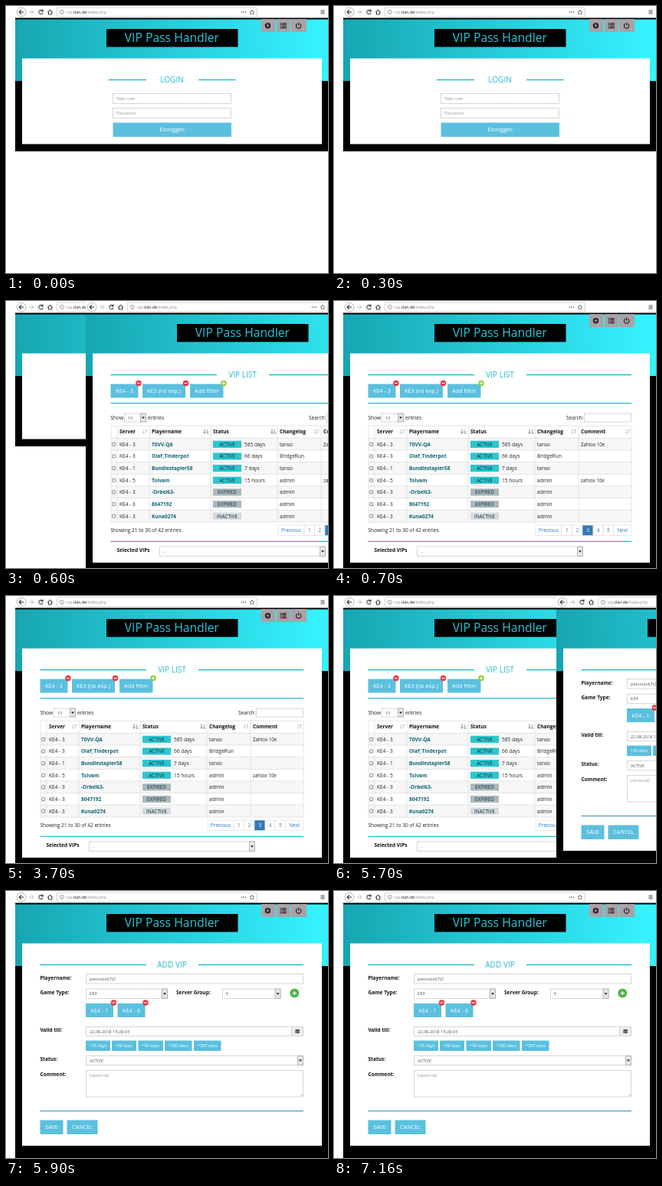
Recreate the animation shown at these times as an HTML page. Size 420 by 349 pixels, loop 8000 ms.

```html
<!DOCTYPE html>
<html lang="de">
<head>
<meta charset="utf-8">
<title>VIP Pass Handler</title>
<style>
  html, body { margin: 0; width: 100%; height: 100%; overflow: hidden; background: #fff; }
  svg { display: block; width: 420px; height: 349px; font-family: "Open Sans", sans-serif; }
  text { white-space: pre; }
</style>
</head>
<body>
<svg id="stage" viewBox="0 0 420 349"></svg>
<script>
const TEAL = '#24bccb', BLUE = '#5bc0de', INK = '#222', BORDER = '#ccc', LINK = '#337ab7';

// Basic shapes. Boxes are given by their edges, text by its vertical centre.
const rect = (x1, y1, x2, y2, fill, extra = '') =>
  `<rect x="${x1}" y="${y1}" width="${x2 - x1}" height="${y2 - y1}" fill="${fill}" ${extra}/>`;
const frame = (x1, y1, x2, y2, stroke = BORDER, fill = '#fff') =>
  rect(x1 + .5, y1 + .5, x2 - .5, y2 - .5, fill, `stroke="${stroke}" stroke-width=".8"`);
const text = (x, y, str, size = 6.55, fill = INK, extra = '') =>
  `<text x="${x}" y="${y + size * .36}" font-size="${size}" fill="${fill}" ${extra}>${str}</text>`;
const bold = (x, y, str, fill = '#111') => text(x, y, str, 6.55, fill, 'font-weight="700"');
const centred = (x, y, str, size, fill) => text(x, y, str, size, fill, 'text-anchor="middle"');
const path = (d, stroke = '#444', width = 1) =>
  `<path d="${d}" fill="none" stroke="${stroke}" stroke-width="${width}"/>`;
const shape = (d, fill) => `<path d="${d}" fill="${fill}"/>`;
const dot = (x, y, r, fill, extra = '') => `<circle cx="${x}" cy="${y}" r="${r}" fill="${fill}" ${extra}/>`;
const rule = (x1, x2, y, color = TEAL) => path(`M${x1} ${y}H${x2}`, color, 1.3);
const plus = (x, y, r, color, width) => path(`M${x - r} ${y}h${2 * r}M${x} ${y - r}v${2 * r}`, color, width);

// Form parts
const button = (x1, y1, x2, y2, label, size = 7.3) =>
  rect(x1, y1, x2, y2, BLUE) + centred((x1 + x2) / 2, (y1 + y2) / 2, label, size, '#fff');
const input = (x1, y1, x2, y2, value = '', fill = '#555') =>
  frame(x1, y1, x2, y2) + text(x1 + 5, (y1 + y2) / 2, value, 5.6, fill);
const select = (x1, y1, x2, y2, value) => {
  const y = (y1 + y2) / 2;
  return input(x1, y1, x2, y2, value) + frame(x2 - 8, y1, x2, y2, '#aaa', '#e6e6e6') +
    shape(`M${x2 - 6} ${y - 1}h4l-2 2.6z`, '#222');
};
const removeBadge = (x, y) => dot(x, y, 3.7, '#ee3338') + path(`M${x - 2} ${y}h4`, '#fff', 1.3);
const addBadge = (x, y) => dot(x, y, 3.7, '#8fd02c') + plus(x, y, 2.1, '#fff', 1.2);
const heading = (label, x1, x2) =>
  rule(x1, 183, 96.5) + rule(251, x2, 96.5) + centred(216.5, 96.5, label, 10.1, TEAL);

const toolbar = () =>
  rect(12, 0, 420, 16, '#fff') +
  dot(20, 8, 6, '#fafafa', 'stroke="#aaa" stroke-width=".8"') +
  path('M23.2 8H17.2M20 5.2L17.2 8L20 10.8', '#333', 1.1) +
  path('M30 8H35.5M33 5.2L35.8 8L33 10.8', '#bbb') +
  path('M47.6 6.4A2.7 2.7 0 1 0 48 9M48.1 4.6V7H45.7', '#444', 1.1) +
  path('M54.3 8.4L57.5 5.2L60.7 8.4M55.4 8V11H59.6V8', '#444', 1.1) +
  rect(66.5, 2, 327.5, 14, '#fff', 'rx="1" stroke="#ccc" stroke-width=".8"') +
  dot(73, 8, 2.6, 'none', 'stroke="#888" stroke-width=".7"') + path('M73 7.6V9.6M73 6.2V7', '#888', .7) +
  text(79, 8, 'vip.<tspan fill="#111">clan.de</tspan>/index.php', 5.2, '#888') +
  [307.5, 310, 312.5].map(x => dot(x, 8, .75, '#444')).join('') +
  path('M321 5l.9 2.1 2.2.2-1.7 1.5.5 2.2-1.9-1.2-1.9 1.2.5-2.2-1.7-1.5 2.2-.2z', '#555', .7) +
  path('M410.5 6h5M410.5 8h5M410.5 10h5', '#444', .9);

const menu = () =>
  [[333, 351], [353, 371], [372, 392]].map(([a, b]) => rect(a, 17, b, 34, '#a9a2a6')).join('') +
  dot(341.5, 25.7, 3.7, '#222') + plus(341.5, 25.7, 2.1, '#a9a2a6', 1.1) +
  [22.9, 24.8, 26.7, 28.6].map(y => path(`M357.5 ${y}h1.3M359.6 ${y}h6.2`, '#222', 1.1)).join('') +
  path('M379.8 23.3A3.2 3.2 0 1 0 383.4 23.3M381.6 21.7V25.5', '#222', 1.2);

const page = (bottom, panelBottom, content) =>
  toolbar() + rect(12, 15.5, 420, bottom, '#000') + rect(12, 17.5, 420, 98, 'url(#sky)') + menu() +
  rect(131, 30, 302.5, 53.5, '#000') + centred(216.3, 41, 'VIP Pass Handler', 15.7, '#2cc4d8') +
  rect(21, 68.5, 412, panelBottom, '#fff') + content;

const login = () => page(190, 180.5,
  heading('LOGIN', 134, 299.5) +
  input(139, 114, 294, 128, 'Web user', '#999') +
  input(139, 133, 294, 147, 'Password', '#999') +
  button(139.5, 152.5, 294, 171, 'Einloggen', 7.1));

const STATUS = { ACTIVE: '#2bc6cf', EXPIRED: '#aab9be', INACTIVE: '#d3dcdf' };
const ROWS = [
  ['KE4 - 3', 'T0VV-QA', 'ACTIVE', '585 days', 'tanso', 'Zahlox 10e'],
  ['KE4 - 3', 'Olaf_Tinderpot', 'ACTIVE', '66 days', 'BridgeRun', ''],
  ['KE4 - 1', 'Bundlestapler58', 'ACTIVE', '7 days', 'tanso', ''],
  ['KE4 - 5', 'Tolvam', 'ACTIVE', '15 hours', 'admin', 'zahlox 10e'],
  ['KE4 - 3', '-Orbel63-', 'EXPIRED', '', 'admin', ''],
  ['KE4 - 3', '8047192', 'EXPIRED', '', 'admin', ''],
  ['KE4 - 3', 'Kuna0274', 'INACTIVE', '', 'admin', ''],
];
const COLUMNS = [
  ['Server', 56, 89], ['Playername', 98, 169, true], ['Status', 178, 257, true],
  ['Changelog', 265, 313], ['Comment', 322, 383],
];

const sortIcon = (x, sorted) => sorted
  ? path(`M${x - 2} 167.5v5.5M${x - 3.3} 171.6l1.3 1.6 1.3-1.6M${x + .5} 173h3M${x + .5} 171h2.3M${x + .5} 169h1.5`, '#777', .9)
  : path(`M${x - 1.7} 167.5v5.5M${x - 3} 171.6l1.3 1.6 1.3-1.6M${x + 1.7} 173.5v-5.5M${x + .4} 169.4l1.3-1.6 1.3 1.6`, '#bbb', .8);

const tableRow = ([server, player, status, left, log, comment], i) => {
  const top = 179.3 + i * 15.65, y = top + 8.1;
  return (i % 2 ? '' : rect(45, top, 388, top + 15.65, '#f7f7f7')) +
    path(`M45 ${top}H388`, '#ddd', .8) +
    rect(46.7, y - 2.1, 50.7, y + 1.9, '#fff', 'rx=".6" stroke="#555" stroke-width=".7"') +
    text(56, y, server) + bold(98, y, player, '#0c6470') +
    rect(178, y - 4.7, 215, y + 4.5, STATUS[status]) + centred(196.5, y, status, 6.4, '#173238') +
    text(219, y, left) + text(265, y, log) + text(322, y, comment, 6.2);
};

const pager = () => {
  const edges = [263, 297, 310.5, 324, 338, 351, 364.5, 388];
  return ['Previous', 1, 2, 3, 4, 5, 'Next'].map((label, i) => {
    const a = edges[i], b = edges[i + 1], on = label === 3;
    return rect(a, 293, b, 306.5, on ? LINK : '#fff', 'stroke="#ddd" stroke-width=".7"') +
      centred((a + b) / 2, 299.7, label, 6.5, on ? '#fff' : LINK);
  }).join('');
};

const list = () => page(349, 342,
  heading('VIP LIST', 44.5, 388) +
  button(44.5, 108.5, 80.5, 126.5, 'KE4 - 3') + removeBadge(81, 107.5) +
  button(86, 108.5, 142, 126.5, 'KE3 (no exp.)') + removeBadge(142.5, 107.5) +
  button(148, 108.5, 191.5, 126.5, 'Add filter') + addBadge(192, 107.5) +
  rule(44.5, 388, 133.7) +
  text(44.5, 152.3, 'Show') + select(62, 146.5, 91, 158.5, '10') + text(93, 152.3, 'entries') +
  text(303, 152.3, 'Search:') + input(326, 146.5, 388, 158.5) +
  ROWS.map(tableRow).join('') +
  path([45, 53, 95, 175, 262, 319, 388].map(x => `M${x} 163V289`).join('') + 'M45 163H388M45 289H388', '#ddd', .8) +
  COLUMNS.map(([label, x, iconX, sorted]) => bold(x, 170.5, label) + sortIcon(iconX, sorted)).join('') +
  text(44.5, 299.8, 'Showing 21 to 30 of 42 entries') + pager() +
  rule(44.5, 388, 314.3) +
  bold(52.5, 325.5, 'Selected VIPs') + select(108, 320.5, 325, 334, '..'));

const add = () => page(349, 333,
  heading('ADD VIP', 44.5, 388) +
  bold(44.5, 114, 'Playername:') + input(104, 108, 388, 121.5, 'personjvk7t2') +
  bold(44.5, 133, 'Game Type:') + select(104, 127.5, 211, 141, 'KE4') +
  bold(222, 133, 'Server Group:') + select(282, 127.5, 358.5, 141, '6') +
  dot(376.3, 133.5, 6, '#4fb948') + plus(376.3, 133.5, 2.4, '#fff', 1.4) +
  button(104, 147, 140, 165, 'KE4 - 1') + removeBadge(140.5, 146) +
  button(145.5, 147, 181.5, 165, 'KE4 - 6') + removeBadge(182, 146) +
  bold(44.5, 182, 'Valid till:') + input(104, 177, 373, 190, '22.08.2018 15:28:03') +
  frame(372, 177, 388, 190, BORDER, '#eee') +
  rect(377.5, 181, 382.7, 186, '#333') + path('M377.5 182.7h5.2M377.5 184.4h5.2M379.3 182.7v3.3M381 182.7v3.3', '#ccc', .4) +
  [['+30', 104, 136], ['+60', 138, 170], ['+90', 172.5, 205], ['+180', 207, 242.5], ['+365', 245, 280.5]]
    .map(([n, a, b]) => button(a, 195.5, b, 209, n + ' days', 5.6)).join('') +
  bold(44.5, 220, 'Status:') + select(104, 215, 388, 228, 'ACTIVE') +
  bold(44.5, 239.5, 'Comment:') + frame(104, 234, 388, 269.5) + text(109, 240.5, '(optional)', 5.6, '#999') +
  path('M384 268l3-3M386 268l1-1', '#999', .6) +
  rule(44.5, 388, 287.5, '#63a9cf') +
  button(44.5, 299.5, 74.5, 318, 'SAVE') + button(79.5, 299.5, 119.5, 318, 'CANCEL'));

const stage = document.getElementById('stage');
stage.innerHTML = `<defs><linearGradient id="sky" gradientUnits="userSpaceOnUse" x1="12" y1="40" x2="405" y2="10">
  <stop stop-color="#16a6b2"/><stop offset=".5" stop-color="#26cbd7"/><stop offset="1" stop-color="#36f1ff"/>
  </linearGradient></defs>` + [login, list, add].map(draw => `<g>${draw()}</g>`).join('');
const screens = [...stage.querySelectorAll('g')];

// [start ms, settled screen, x offset of the next screen sliding over it]
const STEPS = [[0, 0], [500, 0, 276], [600, 0, 92], [700, 1], [5700, 1, 278], [5800, 1, 94], [5900, 2]];

function render() {
  const t = performance.now() % 8000;
  const [, current, offset] = STEPS.findLast(([start]) => t >= start);
  screens.forEach((g, i) => {
    const sliding = offset !== undefined && i === current + 1;
    g.style.display = i === current || sliding ? '' : 'none';
    g.setAttribute('transform', `translate(${sliding ? offset : 0})`);
  });
  requestAnimationFrame(render);
}
render();
</script>
</body>
</html>
```
